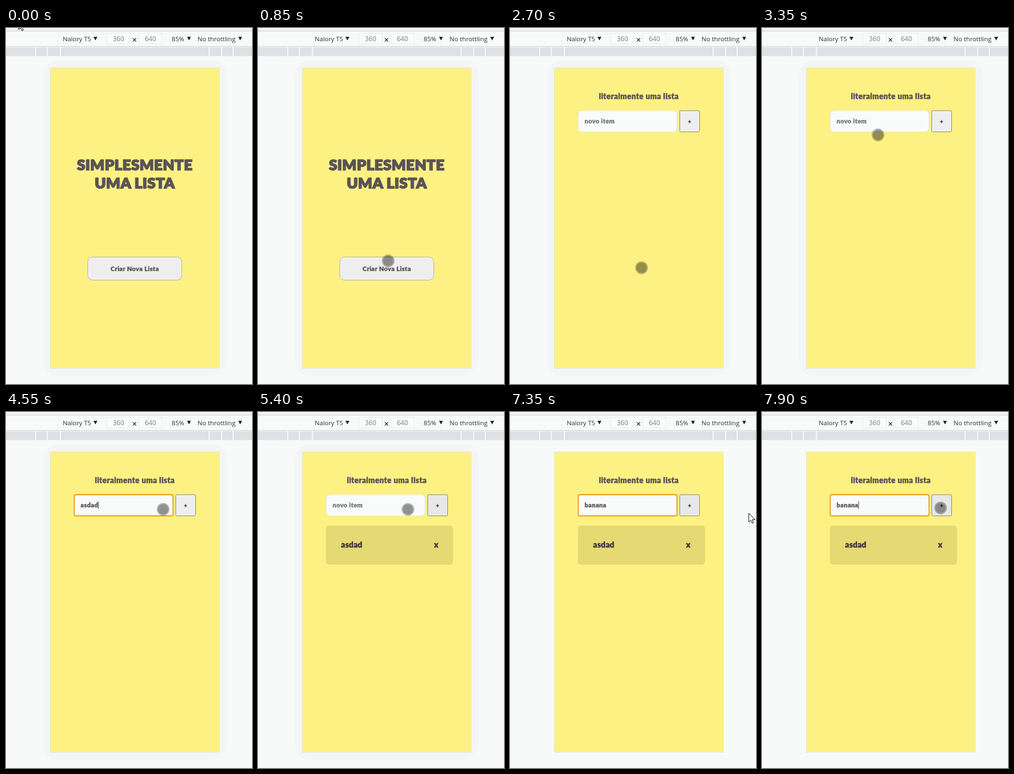
An HTML page that plays this animation: 447 by 646 pixels, repeating every 8000 ms.

```html
<!DOCTYPE html>
<html lang="pt">
<head>
<meta charset="utf-8">
<title>Lista</title>
<style>
html, body { margin: 0; width: 100%; height: 100%; overflow: hidden; background: #f8faf9; }
svg { display: block; width: 447px; height: 646px; }
text { white-space: pre; }
.bar { font: 11.6px "Open Sans", "Noto Sans", sans-serif; fill: #333; }
.size { font-size: 12px; fill: #808080; text-anchor: middle; }
.app { font: 900 11.4px Lato, sans-serif; letter-spacing: .4px; fill: #5a5458; stroke: #5a5458; stroke-width: .3; stroke-linejoin: round; }
.mid { text-anchor: middle; }
.big { font-size: 27px; stroke-width: 1.7; }
.head { font-size: 14px; stroke-width: .5; }
.dark { fill: #403b38; stroke: #403b38; }
</style>
</head>
<body>
<svg viewBox="0 0 447 646">
  <rect width="447" height="646" fill="#f8faf9"/>
  <rect width="447" height="5" fill="#f3f5f5"/>
  <path d="M0 5.5h447M0 33.5h447" stroke="#cdcfd0"/>
  <g class="bar">
    <text x="103" y="24">Nalory T5</text>
    <g fill="#fafcfb" stroke="#eceeee">
      <rect x="183.5" y="9.5" width="42" height="19"/>
      <rect x="241.5" y="9.5" width="42" height="19"/>
    </g>
    <text class="size" x="204.5" y="24">360</text>
    <text class="size" x="262.5" y="24">640</text>
    <path d="M230.5 18.5l6 6m0-6l-6 6" stroke="#333" stroke-width="1.3"/>
    <text x="301" y="24">85%</text>
    <text x="348" y="24">No throttling</text>
    <path d="M159 16h7l-3.5 6.5zM329 16h7l-3.5 6.5zM422 16h7l-3.5 6.5z" fill="#222"/>
  </g>
  <rect y="35" width="447" height="16" fill="#dee2e4"/>
  <path d="M54 35v16M75 35v16M99 35v16M369 35v16M392 35v16M413 35v16" stroke="#f8faf9" stroke-width="2"/>
  <rect id="bezel" x="68" y="59.5" width="333" height="571" rx="25" fill="#f3f5f6"/>
  <rect x="80.5" y="72.5" width="307" height="545" fill="#fef183" stroke="#e4e5dd"/>

  <g id="home" class="app mid">
    <text class="big" x="234" y="258">SIMPLESMENTE</text>
    <text class="big" x="234" y="291">UMA LISTA</text>
    <rect x="148.5" y="415.5" width="171" height="42" rx="9" fill="#efeeee" stroke="#b3b2ac" stroke-width="1"/>
    <text x="234" y="441">Criar Nova Lista</text>
  </g>

  <g id="list" class="app">
    <text class="head mid" x="234" y="129">literalmente uma lista</text>
    <rect id="field" x="124" y="150" width="179.5" height="38.5" fill="#f9fbfb"/>
    <text id="entry" x="135.5" y="173"></text>
    <rect id="caret" y="162" width="1" height="14" fill="#444" stroke="none"/>
    <rect id="add" x="308.5" y="150" width="36" height="38.5" rx="2" stroke="#858585" stroke-width="1"/>
    <path d="M323.5 170h5.5m-2.75-2.75v5.5" stroke="#4c4769" stroke-width="1.7"/>
    <g id="item">
      <rect x="123.5" y="206" width="231" height="71" rx="6" fill="#e5d974" stroke="none"/>
      <text class="head dark" x="151" y="246">asdad</text>
      <text class="head dark mid" x="324" y="246">x</text>
    </g>
  </g>

  <g id="touch">
    <circle r="10.5" fill="none" stroke="#000" stroke-opacity=".28" stroke-width="2"/>
    <circle r="9.5" fill="#000" fill-opacity=".42"/>
  </g>
  <path id="arrow" d="M0 0V16l3.7-3.5 2.3 5.4 2.5-1-2.3-5.3h5z" fill="#fff" stroke="#000"/>
</svg>
<script>
const OPEN = 2700, FOCUS = 3850, ADD = 5300, REFOCUS = 5850;

// each move: start, end, x, y
const moves = [
  [50, 850, 236.5, 422.5], [1150, 1500, 264, 370], [1500, 2000, 227.5, 327.5],
  [2000, 2400, 239, 435], [2900, 3500, 209, 178], [4200, 4500, 285.5, 176.5],
  [4950, 5100, 335, 177], [5250, 5700, 222.5, 176.5], [7100, 7400, 440, 184], [7400, 7900, 324.5, 174]
];

const el = id => document.getElementById(id);
const show = (id, on) => { el(id).style.display = on ? '' : 'none'; };
const easeOut = u => 1 - (1 - u) ** 2;

function pointer(t) {
  let x = 23, y = -13;
  for (const [start, end, toX, toY] of moves) {
    const u = easeOut(Math.min(1, Math.max(0, (t - start) / (end - start))));
    x += (toX - x) * u;
    y += (toY - y) * u;
  }
  return [x, y];
}

// text typed so far, and the time of the last key or focus
function typing(t) {
  const [word, focus, start, step] = t < ADD ? ['asdad', FOCUS, 4250, 75] : ['banana', REFOCUS, 6250, 110];
  const n = Math.min(word.length, Math.max(0, Math.floor((t - start) / step) + 1));
  return [word.slice(0, n), n ? start + (n - 1) * step : focus];
}

function drawEntry(t) {
  const [text, since] = typing(t);
  const focus = t >= FOCUS && t < ADD || t >= REFOCUS;
  const field = el('field'), entry = el('entry');
  field.setAttribute('stroke', focus ? '#e49a12' : '#e3e5dc');
  field.setAttribute('stroke-width', focus ? 1.8 : 1);
  field.setAttribute('rx', focus ? 3 : 7);
  entry.textContent = text || 'novo item';
  entry.style.fill = entry.style.stroke = text ? '' : '#757575';
  el('caret').setAttribute('x', 135.5 + (text ? entry.getComputedTextLength() : 0));
  show('caret', focus && Math.floor((t - since) / 500) % 2 === 0);
}

function drawPointer(t) {
  const [x, y] = pointer(t);
  const inside = x > 80 && x < 388 && y > 72 && y < 618;
  show('touch', inside);
  show('arrow', !inside);
  el(inside ? 'touch' : 'arrow').setAttribute('transform', `translate(${x} ${y})`);
}

function frame(now) {
  const t = Math.floor((now % 8000) / 50) * 50;
  show('home', t < OPEN);
  show('list', t >= OPEN);
  show('item', t >= ADD);
  show('bezel', t < 7150);
  el('add').setAttribute('fill', t < ADD ? '#efeeef' : '#e8e8e8');
  if (t >= OPEN) drawEntry(t);
  drawPointer(t);
  requestAnimationFrame(frame);
}
frame(0);
</script>
</body>
</html>
```
